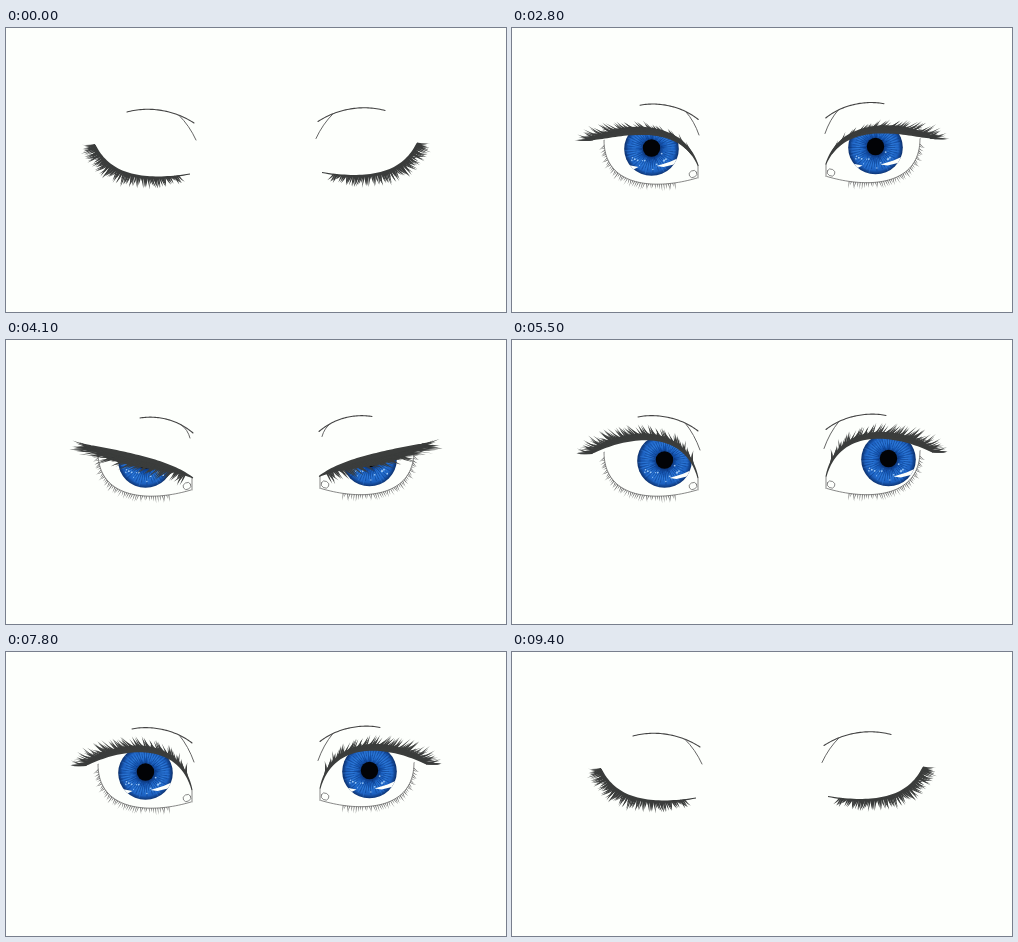
Animation of 500x284 px, one loop 9500 ms. Source, as an HTML page with a canvas:

```html
<!DOCTYPE html>
<html lang="en">
<head>
<meta charset="utf-8">
<title>Blinking eyes</title>
<style>
html, body { margin: 0; width: 100%; height: 100%; overflow: hidden; background: #fdfffc; }
canvas { display: block; width: 500px; height: 284px; }
</style>
</head>
<body>
<canvas id="stage"></canvas>
<script>
const W = 500, H = 284, LOOP = 9500, STEP = 100, TURN = Math.PI * 2;
const PAPER = '#fdfffc', INK = '#3b3d3c', FINE = '#555';
const canvas = document.getElementById('stage');
const ctx = canvas.getContext('2d');
const dpr = window.devicePixelRatio || 1;
canvas.width = W * dpr;
canvas.height = H * dpr;

// Curves are cubic Béziers from outer to inner corner.
// lash: angle at the outer and inner end in degrees, then length.
const closed = {
  lid: [89,117, 103,150, 140,154, 184,146],
  crease: [121,84, 143,78, 168,82, 188,95],
  fold: [190,112], band: [2], lash: [172, 40, 15]
};
const half = {
  lid: [84,106, 115,122, 160,122, 187,138],
  crease: [134,78, 152,75, 172,80, 187,93],
  fold: [184,98], band: [11], lash: [188, 120, 21]
};
const open = {
  lid: [80,113, 103,95, 172,80, 186,138],
  crease: [126,77, 145,73, 170,78, 186,91],
  fold: [188,110], band: [6], lash: [188, 280, 18]
};
const LOW = [92,112, 92,160, 145,162, 185,150];

// The right eye is the left one mirrored, a touch higher.
const eyes = [
  { side: 1, x: 0, y: 0, iris: 139.5 },
  { side: -1, x: W, y: -1.5, iris: 136.5 }
];

const clamp = (v, a = 0, b = 1) => Math.min(b, Math.max(a, v));
const ramp = (n, a, b) => clamp((n - a + 1) / (b - a + 1));
const rnd = i => { const v = Math.sin(i * 12.9898 + 4.1) * 43758.5453; return v - Math.floor(v); };
const mix = (a, b, k) => a.map((v, i) => v + (b[i] - v) * k);

// Openness runs from 0 to 9 with the half pose at 5.
function poseAt(s) {
  const [a, b, k] = s < 5 ? [closed, half, s / 5] : [half, open, (s - 5) / 4];
  return Object.fromEntries(Object.keys(a).map(key => [key, mix(a[key], b[key], k)]));
}

function at(p, t) {
  const u = 1 - t;
  return [0, 1].map(d =>
    u * u * u * p[d] + 3 * u * u * t * p[2 + d] + 3 * u * t * t * p[4 + d] + t * t * t * p[6 + d]);
}

const sample = (p, count = 40) => Array.from({ length: count + 1 }, (_, i) => at(p, i / count));

function trace(points) {
  ctx.beginPath();
  points.forEach(q => ctx.lineTo(...q));
}

function stroke(width, color) {
  ctx.lineWidth = width;
  ctx.strokeStyle = color;
  ctx.stroke();
}

function fillPoly(points, color) {
  trace(points);
  ctx.fillStyle = color;
  ctx.fill();
}

function dot(x, y, r, color) {
  ctx.beginPath();
  ctx.arc(x, y, r, 0, TURN);
  ctx.fillStyle = color;
  ctx.fill();
}

// Keep drawing between a curve and the given edge of the stage.
function clipTo(curve, edge) {
  const points = sample(curve), a = points[0], b = points[points.length - 1];
  trace([...points, [b[0], edge], [a[0], edge]]);
  ctx.clip();
}

function drawIris(dx, glint) {
  ctx.beginPath();
  ctx.ellipse(0, 0, 27.3, 26.7, 0, 0, TURN);
  ctx.clip();
  const g = ctx.createRadialGradient(0, 0, 7, 0, 0, 28);
  ['#0a2f70', '#1557b4', '#246fd0', '#1c60bf', '#08265c'].forEach((c, i) => g.addColorStop(i / 4, c));
  ctx.fillStyle = g;
  ctx.fillRect(-30, -30, 60, 60);
  for (let i = 0; i < 100; i++) {
    const a = i / 100 * TURN, r = 9 + rnd(i) * 8, e = 18 + rnd(i + 200) * 9;
    const c = Math.cos(a), s = Math.sin(a);
    trace([[c * r, s * r], [c * e, s * e]]);
    stroke(0.8, i % 2 ? 'rgba(70,150,245,.35)' : 'rgba(6,36,96,.4)');
  }
  dot(0, -1, 8.7, '#020306');
  for (let i = 0; i < 13; i++) {
    const a = 0.2 + rnd(i + 40) * 2.6, r = 11 + rnd(i + 60) * 12;
    dot(Math.cos(a) * r, Math.sin(a) * r, 0.5 + rnd(i + 80) * 0.6, 'rgba(175,215,255,.85)');
  }
  if (!glint) return;
  fillPoly([[29, 8], [18, 13], [5, 17], [12, 18], [29, 14]], PAPER);
  // The left glint stays in place while the iris slides.
  ctx.translate(-dx, 0);
  fillPoly([[-29, 15], [-13, 18], [-17, 20], [-29, 25]], PAPER);
}

function lash(x, y, angle, len, width) {
  const c = Math.cos(angle), s = Math.sin(angle), w = width / 2;
  const mx = x + c * len / 2, my = y + s * len / 2 + len * 0.08;
  ctx.beginPath();
  ctx.moveTo(x + s * w, y - c * w);
  ctx.quadraticCurveTo(mx + s * w * 0.6, my - c * w * 0.6, x + c * len, y + s * len);
  ctx.quadraticCurveTo(mx - s * w * 0.6, my + c * w * 0.6, x - s * w, y + c * w);
  ctx.fill();
}

function drawUpperLid({ lid, band, lash: [outer, inner, length] }) {
  const mid = sample(lid), upper = [], lower = [];
  mid.forEach((q, i) => {
    const a = mid[Math.max(0, i - 1)], b = mid[Math.min(mid.length - 1, i + 1)];
    const angle = Math.atan2(b[1] - a[1], b[0] - a[0]);
    const w = (1 + band[0] * Math.sin(Math.PI * (i / 40) ** 0.7)) / 2;
    const nx = -Math.sin(angle) * w, ny = Math.cos(angle) * w;
    upper.push([q[0] - nx, q[1] - ny]);
    lower.unshift([q[0] + nx, q[1] + ny]);
  });
  fillPoly([...upper, ...lower], INK);

  // Lashes crowd toward the outer corner.
  const count = 110;
  for (let i = 0; i < count; i++) {
    const t = 0.92 * (i / count) ** 1.3;
    const angle = (outer + (inner - outer) * t) * Math.PI / 180 + (rnd(i + 500) - 0.5) * 0.6;
    lash(...at(lid, t), angle, length * (1 - 0.5 * t * t) * (0.5 + rnd(i + 300) * 0.6), 2);
  }
}

function drawLowerLid() {
  trace(sample(LOW));
  stroke(0.7, FINE);
  ctx.fillStyle = '#666';
  for (let i = 0; i < 46; i++) {
    const t = 0.04 + i / 46 * 0.8;
    const angle = 2.8 - t * 1.8 + (rnd(i + 800) - 0.5) * 0.6;
    lash(...at(LOW, t), angle, 4 + rnd(i + 700) * 4, 0.9);
  }
  ctx.beginPath();
  ctx.ellipse(181, 146, 4, 3.4, -0.5, 0, TURN);
  ctx.moveTo(186, 138);
  ctx.lineTo(186, 150);
  stroke(0.7, FINE);
}

function drawEye(eye, s, dx) {
  const pose = poseAt(s);
  ctx.save();
  ctx.translate(eye.x, eye.y);
  ctx.scale(eye.side, 1);

  trace(sample(pose.crease));
  stroke(1.1, '#444');
  const [fx, fy] = at(pose.crease, 0.76);
  ctx.beginPath();
  ctx.moveTo(fx, fy);
  ctx.quadraticCurveTo((fx + pose.fold[0]) / 2 + 2, (fy + pose.fold[1]) / 2 - 2, ...pose.fold);
  stroke(0.9, FINE);

  if (s > 0) {
    ctx.save();
    clipTo(pose.lid, H);
    clipTo(LOW, 0);
    ctx.translate(eye.iris + dx * eye.side, 121);
    ctx.scale(eye.side, 1);
    drawIris(dx, s > 5);
    ctx.restore();
    drawLowerLid();
  }
  drawUpperLid(pose);
  ctx.restore();
}

// Both rules count in steps of 100 ms.
const openness = n =>
  clamp(n < 28 ? n - 9 : n < 86 ? Math.abs(n - 36) : 94 - n, 0, 9);
const gaze = n => 13 * ramp(n, 53, 55) - 30 * ramp(n, 63, 68) + 17 * ramp(n, 76, 78);

let shown = -1;
const start = performance.now();
function frame() {
  const n = Math.floor((performance.now() - start) % LOOP / STEP);
  if (n !== shown) {
    shown = n;
    ctx.setTransform(dpr, 0, 0, dpr, 0, 0);
    ctx.fillStyle = PAPER;
    ctx.fillRect(0, 0, W, H);
    ctx.lineCap = ctx.lineJoin = 'round';
    for (const eye of eyes) drawEye(eye, openness(n), gaze(n));
  }
  requestAnimationFrame(frame);
}
frame();
</script>
</body>
</html>
```
